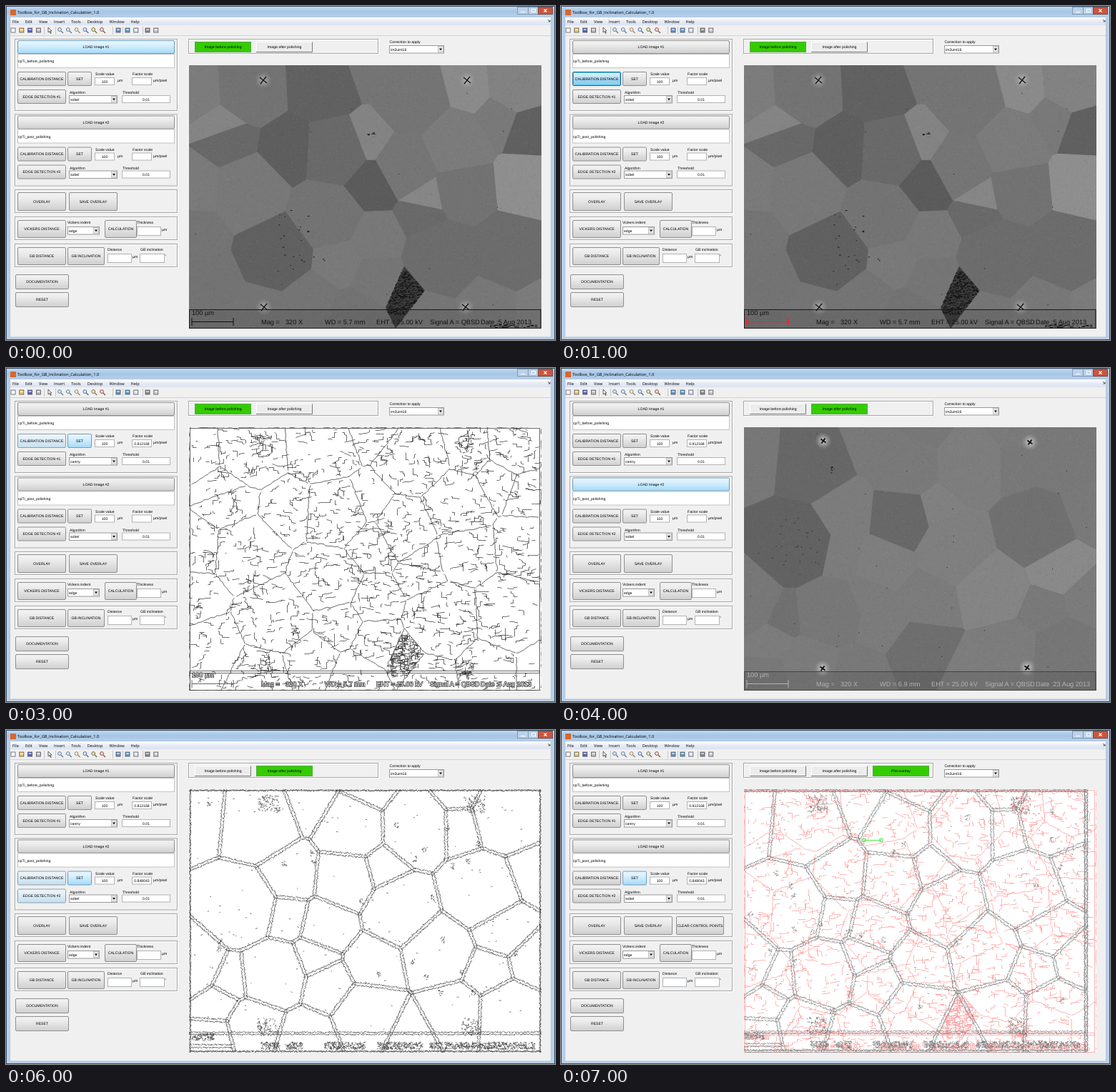
An HTML page with a canvas that plays this animation: 768 by 468 pixels, repeating every 8 s.

```html
<!DOCTYPE html>
<html lang="en">
<head>
<meta charset="utf-8">
<title>GB inclination toolbox</title>
<style>
html, body { margin: 0; width: 100%; height: 100%; overflow: hidden; background: #f0f0f0; }
svg, canvas { position: absolute; left: 0; top: 0; }
canvas { left: 256px; top: 83px; }
text { font: 5.15px "Liberation Sans", Arial, sans-serif; text-rendering: geometricPrecision; }
.title { font: 5.7px "Open Sans", sans-serif; }
.menu { font: 5.6px "Open Sans", sans-serif; word-spacing: 7.6px; }
</style>
</head>
<body>
<svg id="ui" width="768" height="468"></svg>
<canvas id="picture" width="493" height="369"></canvas>
<script>
const ui = document.getElementById('ui');
const ctx = document.getElementById('picture').getContext('2d');

// One entry per second; hot: 1 = fading, 2 = hovered, 3 = focused
const STEPS = [
  { picture: 'before', hot: { L1: 2 } },
  { picture: 'before', bar: true, hot: { C1: 3 } },
  { picture: 'before', bar: true, hot: { C1: 1, S1: 3 } },
  { picture: 'canny', hot: { C1: 1, S1: 2 } },
  { picture: 'after', tab: 1, hot: { L2: 2 } },
  { picture: 'after', bar: true, tab: 1, hot: { S2: 3 } },
  { picture: 'sobel', tab: 1, hot: { C2: 1, S2: 2, E2: 1 } },
  { picture: 'overlay', tab: 2, hot: { S2: 2 } },
];

/* ---------- Window ---------- */

const rect = (x, y, w, h, fill, stroke = 'none', extra = '') =>
  `<rect x="${x}" y="${y}" width="${w}" height="${h}" fill="${fill}" stroke="${stroke}" ${extra}/>`;
const box = (x, y, w, h, fill, stroke, extra) => rect(x + .5, y + .5, w - 1, h - 1, fill, stroke, extra);
const path = (d, stroke, width = 1, fill = 'none') =>
  `<path d="${d}" stroke="${stroke}" stroke-width="${width}" fill="${fill}"/>`;
const text = (x, y, s, extra = '') => `<text x="${x}" y="${y}" ${extra}>${s}</text>`;
const centred = (x, y, s) => text(x, y, s, 'text-anchor="middle"');
const gradient = (id, ...stops) => `<linearGradient id="${id}" x2="0" y2="1">` +
  stops.map((c, i) => `<stop offset="${i / (stops.length - 1)}" stop-color="${c}"/>`).join('') + '</linearGradient>';

const DEFS = '<defs>' +
  gradient('button0', '#f3f3f3', '#ebebeb', '#dddddd', '#cfcfcf') +
  gradient('button1', '#f0f6fa', '#e4eff6', '#d2e7f3', '#c6dfee') +
  gradient('button2', '#eaf6fd', '#d9f0fc', '#bee6fd', '#a7d9f5') +
  gradient('button3', '#e5f4fc', '#c4e5f6', '#98d1ef', '#8ccdee') +
  gradient('title', '#c9dcf0', '#a5c5e6', '#b9d1ea') +
  gradient('menu', '#ffffff', '#e6ebf5', '#dbe2f0') + '</defs>';

const button = (x, y, w, h, label, heat = 0) =>
  box(x, y, w, h, `url(#button${heat})`, ['#8f8f8f', '#8aa0ae', '#6d9dbd', '#2c628b'][heat], 'rx="1.5"') +
  (heat > 2 ? box(x + 1, y + 1, w - 2, h - 2, 'none', '#45cdf0') : '') +
  centred(x + w / 2, y + h / 2 + 1.9, label);
const panel = (y, h, x = 12, w = 228) => box(x + 1, y + 1, w, h, 'none', '#fff') + box(x, y, w, h, 'none', '#a6a6a6');
const field = (x, y, w, h, s = '') => box(x, y, w, h, '#fff', '#b0b3b8') + centred(x + w / 2, y + h / 2 + 2, s);
const popup = (x, y, w, s) => box(x, y, w, 11.5, '#fff', '#9a9a9a') + text(x + 2, y + 7.8, s) +
  rect(x + w - 8.5, y + 1.5, 7, 8.5, '#e4e4e4', '#aaa', 'stroke-width=".6"') +
  path(`M${x + w - 7} ${y + 4.5}h4l-2 2.8z`, 'none', 0, '#111');
const toggle = (x, label, on) => box(x, 50, 79, 15, on ? '#3c0' : '#ececec', on ? '#5a4' : '#fff') +
  (on ? '' : path(`M${x} 64.5h78.5v-14`, '#777')) + centred(x + 39.5, 59, label);

function icon(i, colour) {
  const x = [10, 61, 76, 157, 170, 198][[0, 4, 5, 11, 12, 14].findLastIndex(first => i >= first)] +
    11.8 * (i - [0, 4, 5, 11, 12, 14].findLast(first => i >= first));
  if (i === 4) return path(`M${x - 2} 30v7l1.8-1.500 1.500 3 1-.5-1.500-3h2z`, '#222', .7, '#fff');
  if (i < 5 || i > 10) return box(x - 3.5, 30.5, 7, 7, colour, '#556', 'stroke-width=".8"') + path(`M${x - 2} 33h4`, '#fff', 1.2);
  return `<circle cx="${x - 1}" cy="33" r="2.4" fill="#e8eef5" stroke="${colour}"/>` + path(`M${x + 1} 35l3 3`, colour, 1.3);
}
const ICONS = ['#fff', '#efc65c', '#5560c0', '#bbb', '#fff', '#57799e', '#57799e', '#a58563', '#4668a8', '#77712f', '#a04438',
  '#5f92c4', '#54a0d0', '#dfe5f5', '#888', '#ccc'];

const frame = () => rect(0, 0, 768, 468, '#b9d1ea') + rect(0, 0, 768, 16, 'url(#title)') +
  box(0, 0, 768, 468, 'none', '#3b5268') + rect(5.5, 16, 757, 448, '#f0f0f0', '#9fb5cc', 'stroke-width=".6"') +
  rect(6, 5, 8, 8, '#d9662b') + text(16, 11.3, 'Toolbox_for_GB_Inclination_Calculation_1.0', 'class="title"') +
  box(715, 1, 16, 11, '#bdd2e8', '#7f98b3') + box(730, 1, 15, 11, '#bdd2e8', '#7f98b3') + box(744, 1, 21, 11, '#cc563d', '#7a4a44') +
  path('M720 8.5h6M735.5 4.5h5v4h-5zM752.500 4.500l4 4m0-4l-4 4', '#fff', 1.1) +
  rect(6, 16, 756, 11, 'url(#menu)') + text(9, 23.5, 'File Edit View Insert Tools Desktop Window Help', 'class="menu"') +
  path('M758 19l3 3m0-2.500v2.500h-2.500', '#333', .8) +
  path('M6 41.5h756', '#c8c8c8', .7) + [53, 69, 149, 163, 191].map(x => path(`M${x}.5 29v11`, '#bbb', .8)).join('') +
  ICONS.map((colour, i) => icon(i, colour)).join('');

const imagePanel = (n, y, file, algorithm, factor, hot) =>
  panel(y, 101) + button(16, y + 2, 220, 19, `LOAD Image #${n}`, hot['L' + n]) +
  box(16, y + 21, 220, 20, '#fff', '#c4c4c4') + text(17, y + 33, file) +
  button(16, y + 46, 68, 20, 'CALIBRATION DISTANCE', hot['C' + n]) + button(86, y + 46, 34, 20, 'SET', hot['S' + n]) +
  button(16, y + 71, 68, 20, `EDGE DETECTION #${n}`, hot['E' + n]) +
  text(125, y + 51, 'Scale value') + field(124, y + 54, 28, 11, '100') + text(156, y + 60, 'µm') +
  text(177, y + 51, 'Factor scale') + field(176, y + 54, 28, 11, factor) + text(206, y + 60, 'µm/pixel') +
  text(89, y + 77, 'Algorithm') + popup(88, y + 79, 68, algorithm) +
  text(163, y + 77, 'Threshold') + field(162, y + 79, 68, 11, '0.01');

function drawWindow(step, { hot, tab = 0 }) {
  ui.innerHTML = DEFS + frame() +
    imagePanel(1, 46, 'cpTi_before_polishing', step < 3 ? 'sobel' : 'canny', step < 2 ? '' : '0.812168', hot) +
    imagePanel(2, 151.5, 'cpTi_post_polishing', 'sobel', step < 5 ? '' : '0.848043', hot) +
    panel(257, 33) + button(16, 261, 68, 26, 'OVERLAY') + button(88, 261, 68, 26, 'SAVE OVERLAY') +
    (tab > 1 ? button(161, 261, 67, 26, 'CLEAR CONTROL POINTS') : '') +
    panel(295, 33) + button(16, 300, 68, 25, 'VICKERS DISTANCE') + text(86, 305, 'Vickers indent') + popup(86, 309, 45, 'edge') +
    button(138, 300, 45, 25, 'CALCULATION') + text(183, 305, 'Thickness') + field(183, 309, 34, 13) + text(218, 314.5, 'µm') +
    panel(333, 33) + button(16, 338, 68, 25, 'GB DISTANCE') + button(86, 338, 52, 25, 'GB INCLINATION') +
    text(142, 343, 'Distance') + field(142, 347, 34, 13) + text(177, 353, 'µm') +
    text(188, 343, 'GB inclination') + field(187, 347, 35, 13) + text(222, 352, '°') +
    button(13, 376, 75, 21, 'DOCUMENTATION') + button(13, 401, 75, 21, 'RESET') + panel(46, 21, 255, 266) +
    ['Image before polishing', 'Image after polishing', 'Plot overlay'].slice(0, Math.max(2, tab + 1))
      .map((label, i) => toggle(264 + 86 * i, label, tab === i)).join('') +
    text(536.5, 51.5, 'Correction to apply') + popup(536, 55, 77, 'im2uint16');
}

/* ---------- Specimen ---------- */

let seed;
const rand = (a = 1, b = 0) => {
  seed = (seed * 1664525 + 1013904223) >>> 0;
  return b + (a - b) * seed / 2 ** 32;
};
const repeat = (n, draw) => { while (n-- > 0) draw(); };
const grey = v => `rgb(${v},${v},${v})`;
const FRAME = [[256, 83], [749, 83], [749, 452], [256, 452]];

// Keeps the part of a polygon that is nearer to circle a than to circle b.
function clip(poly, a, b) {
  const power = (c, [x, y]) => (x - c.x) ** 2 + (y - c.y) ** 2 - c.r ** 2;
  const side = p => power(a, p) - power(b, p);
  return poly.flatMap((p, i) => {
    const q = poly[(i + 1) % poly.length], s = side(p), t = side(q), k = s / (s - t);
    return [...(s <= 0 ? [p] : []), ...(s * t < 0 ? [[p[0] + (q[0] - p[0]) * k, p[1] + (q[1] - p[1]) * k]] : [])];
  });
}

// Key grains are "x,y,radius,grey"; random circles fill the gaps between them.
function specimen(keys, base, extra) {
  seed = 5;
  const grains = keys.split(' ').map(s => s.split(',').map(Number)).map(([x, y, r, level]) => ({ x, y, r, level }));
  for (let size = 42; size > 15; size -= .1) {
    const x = rand(749, 256), y = rand(440, 83);
    const gap = Math.min(...grains.map(g => Math.hypot(x - g.x, y - g.y) - g.r));
    if (gap > size * .8) grains.push({ x, y, r: size, level: Math.round(rand(base + 5, base - 5)) });
  }
  grains.forEach(a => a.poly = grains.reduce((poly, b) => a === b ? poly : clip(poly, a, b), FRAME));
  return { grains, base, edges: uniqueEdges(grains), ...extra };
}

function uniqueEdges(grains) {
  const edges = new Map();
  grains.forEach(({ poly }) => poly.forEach((p, i) => {
    const q = poly[(i + 1) % poly.length];
    edges.set([p[0] + q[0], p[1] + q[1]].map(Math.round).join(), [p, q]);
  }));
  return [...edges.values()];
}

const before = specimen('445,106,34,97 298,164,18,132 308,192,20,104 394,204,12,94 465,208,34,105 511,248,25,91 512,190,15,131 ' +
  '627,190,40,123 648,116,22,138 715,110,36,130 732,170,22,96 728,250,27,142 588,268,14,134 583,292,13,105 378,350,46,96 ' +
  '612,355,46,108 705,350,46,108 557,402,18,60', 119,
  { marks: [[360, 104], [645, 104], [361, 422], [643, 422]], wd: '5.7', date: '5', ink: '#111' });
const after = specimen('352,130,50,103 325,246,50,98 475,208,36,104 524,195,18,128 665,226,46,112 693,276,30,137 703,118,46,120 ' +
  '605,310,40,132 505,402,40,110 318,350,18,112 705,400,40,118', 122,
  { marks: [[367, 102], [656, 104], [366, 421], [652, 420]], wd: '6.9', date: '23', ink: '#b4b4b4', polished: true });
const charred = before.grains.find(g => g.level === 60);

function trace(pts) {
  ctx.beginPath();
  pts.forEach(([x, y]) => ctx.lineTo(x, y));
}
function line(...pts) {
  trace(pts);
  ctx.stroke();
}
function pen(colour, width) {
  ctx.strokeStyle = colour;
  ctx.lineWidth = width;
}
function clear(colour) {
  ctx.setTransform(1, 0, 0, 1, -256, -83);
  ctx.fillStyle = colour;
  ctx.fillRect(256, 83, 493, 369);
  seed = 11;
}
function specks(n, x, y, w, h, size = 1) {
  repeat(n, () => ctx.fillRect(x + rand(w), y + rand(h), rand(size, 1), 1));
}
function insideCharred(draw) {
  ctx.save();
  trace(charred.poly);
  ctx.clip();
  draw(charred.x - 25, charred.y - 30);
  ctx.restore();
}
function captions({ wd, date }, draw) {
  ctx.font = '9.2px "Liberation Sans", Arial, sans-serif';
  ctx.textRendering = 'geometricPrecision';
  draw('100 µm', 260, 433);
  [['Mag =', 357], ['320 X', 391], [`WD = ${wd} mm`, 446], ['EHT = 25.00 kV', 518], ['Signal A = QBSD', 593], [`Date :${date} Aug 2013`, 664]]
    .forEach(([s, x]) => draw(s, x, 445.5));
}
function scaleBar() {
  line([260, 442.5], [318, 442.5]);
  [260, 318].forEach(x => line([x, 437], [x, 448]));
}

function micrograph(sample, bar) {
  const { grains, marks, base, ink, polished } = sample;
  clear(grey(base));
  grains.forEach(({ poly, level }) => {
    trace(poly);
    ctx.fillStyle = grey(level);
    ctx.fill();
    pen(grey(level), .7);
    ctx.stroke();
  });
  ['#00000014', '#ffffff14'].forEach(tint => {
    ctx.fillStyle = tint;
    specks(6000, 256, 83, 493, 369);
  });
  ctx.fillStyle = '#141414';
  specks(polished ? 30 : 12, 262, 90, 480, 330);
  if (polished) {
    specks(12, 377, 138, 5, 9);
    specks(25, 295, 210, 75, 70);
  } else {
    insideCharred((x, y) => specks(700, x, y, 50, 60, 3));
    specks(6, 503, 177, 10, 4, 4);
    specks(24, 380, 285, 65, 90, 3);
    specks(70, 676, 446, 65, 6, 4);
  }
  marks.forEach(([x, y]) => indent(x, y, polished));
  ctx.fillStyle = '#00000018';
  ctx.fillRect(256, 426, 493, 26);
  pen(polished ? '#444' : '#181818', 1);
  ctx.strokeRect(256.5, 425.5, 491.5, 26);
  ctx.fillStyle = ink;
  captions(sample, (s, x, y) => ctx.fillText(s, x, y));
  pen(bar ? (polished ? '#d45' : '#f22') : ink, 1);
  scaleBar();
  if (bar) [260, 318].forEach(x => ctx.strokeRect(x - 1.5, 441, 3, 3));
}

function indent(x, y, polished) {
  const halo = ctx.createRadialGradient(x, y, 2, x, y, 12);
  halo.addColorStop(0, polished ? '#dddb' : '#ccc8');
  halo.addColorStop(1, '#aaa0');
  ctx.fillStyle = halo;
  ctx.fillRect(x - 12, y - 12, 24, 24);
  const a = polished ? 3.5 : 5;
  pen('#111', polished ? 2 : 1.3);
  line([x - a, y - a + 1], [x + a, y + a - 1]);
  line([x - a + 1, y + a], [x + a - 1, y - a]);
}

/* ---------- Edge maps ---------- */

// Calls visit(x, y, angle) every few pixels along a segment.
function walk([[x0, y0], [x1, y1]], gap, visit) {
  const length = Math.hypot(x1 - x0, y1 - y0), angle = Math.atan2(y1 - y0, x1 - x0);
  for (let d = 0; d <= length; d += gap) visit(x0 + Math.cos(angle) * d, y0 + Math.sin(angle) * d, angle);
}

// Short pixel-stepped contour that prefers to run sideways.
function contour(x, y, steps) {
  const pts = [[x = Math.floor(x) + .5, y = Math.floor(y) + .5]];
  const way = rand() < .5 ? -1 : 1, slope = rand() < .5 ? -1 : 1;
  repeat(steps, () => {
    const run = Math.round(rand(4, 1));
    if (rand() < .68) x += way * run;
    else y += slope * run;
    if (rand() < .4) y += slope;
    pts.push([x, y]);
  });
  line(...pts);
}
function dash(x, y, angle, size = 1.5) {
  const dx = Math.cos(angle) * size, dy = Math.sin(angle) * size;
  line([x - dx, y - dy], [x + dx, y + dy]);
}

function cannyEdges(colour) {
  pen(colour, .75);
  before.edges.forEach(edge => {
    const pts = [];
    walk(edge, 4, (x, y) => pts.push([x + rand(1, -1), y + rand(1, -1)]));
    line(...pts);
  });
  repeat(1050, () => contour(rand(742, 259), rand(421, 86), rand(7, 1)));
  before.marks.forEach(([x, y]) => repeat(26, () => contour(x + rand(12, -13), y + rand(9, -10), 4)));
  insideCharred((x, y) => repeat(260, () => contour(x + rand(50), y + rand(60), 3)));
  repeat(90, () => contour(rand(742, 259), rand(450, 429), 3));
  ctx.strokeRect(257.5, 84.5, 489, 367);
  ctx.strokeRect(257.5, 424.5, 489, 3);
  scaleBar();
  ctx.lineWidth = 1.4;
  ctx.fillStyle = '#fff';
  captions(before, (s, x, y) => {
    ctx.strokeText(s, x, y);
    ctx.fillText(s, x, y);
  });
}

function sobelEdges(colour) {
  pen(colour, .75);
  const cluster = (n, x, y, w, h) => repeat(n, () => dash(x + rand(w, -w), y + rand(h, -h), rand(3), 1.3));
  const double = (edge, half) => walk(edge, 2.2, (x, y, angle) => [-half, half].forEach(o =>
    dash(x - Math.sin(angle) * o + rand(.7, -.7), y + Math.cos(angle) * o + rand(.7, -.7), angle + rand(.9, -.9))));
  after.edges.forEach(edge => double(edge, 1.9));
  FRAME.forEach((p, i) => double([p, FRAME[(i + 1) % 4]], 1.5));
  double([[257, 425], [748, 425]], 1.5);
  double([[260, 443], [318, 443]], 2);
  after.marks.forEach(([x, y]) => cluster(75, x, Math.min(y, 416), 14, 12));
  repeat(170, () => dash(rand(744, 260), rand(420, 90), rand(.6, -.6), rand(1.5, .6)));
  repeat(24, () => cluster(8, rand(735, 270), rand(410, 100), 3, 4));
  captions(after, (s, x, y) => {
    const half = ctx.measureText(s).width / 2;
    cluster(half * 6, x + half, y - 3, half, 5);
  });
}

const PICTURES = {
  before: bar => micrograph(before, bar),
  after: bar => micrograph(after, bar),
  canny() {
    clear('#fff');
    cannyEdges('#333');
  },
  sobel() {
    clear('#fff');
    sobelEdges('#444');
  },
  overlay() {
    clear('#fff');
    cannyEdges('#f99');
    ctx.setTransform(.983, 0, 0, .992, -257.8, -81);
    sobelEdges('#777');
    ctx.setTransform(1, 0, 0, 1, -256, -83);
    pen('#4e4', 1);
    line([424, 154.5], [448, 154.5]);
    [424, 448].forEach(x => ctx.strokeRect(x - 2, 152.5, 4, 4));
  },
};

let shown = -1;
function tick() {
  const step = Math.floor(performance.now() % 8000 / 1000);
  if (step !== shown) {
    shown = step;
    drawWindow(step, STEPS[step]);
    PICTURES[STEPS[step].picture](STEPS[step].bar);
  }
  requestAnimationFrame(tick);
}
tick();
</script>
</body>
</html>
```
